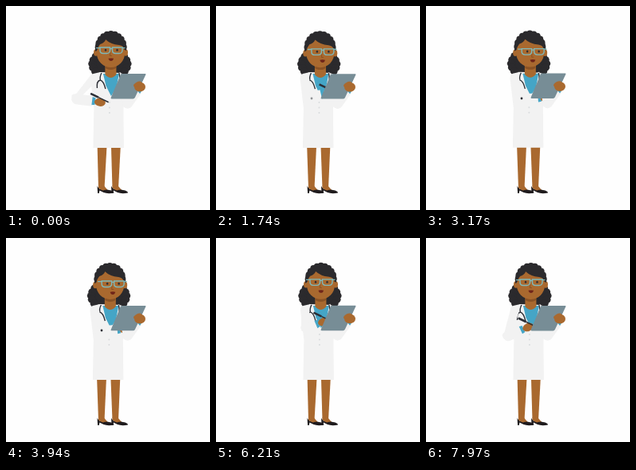
An HTML page with a canvas for the animation above (8 s loop, 256 px wide and 256 px high).

```html
<!DOCTYPE html>
<html lang="en">
<head>
<meta charset="utf-8">
<title>Doctor taking notes</title>
<style>
html, body { margin: 0; width: 100%; height: 100%; overflow: hidden; background: #fefefe; }
canvas { display: block; width: 100vw; height: 100vh; }
</style>
</head>
<body>
<canvas id="stage"></canvas>
<script>
const canvas = document.getElementById('stage');
const ctx = canvas.getContext('2d');
const LOOP = 8000;
const C = {
  bg: '#fefefe', coat: '#f2f2f2', button: '#d9dcde', skin: '#a9692f', shade: '#8a5224',
  hair: '#2b2a2d', shirt: '#45a5c6', board: '#778d96', glasses: '#7fb9ba',
  dark: '#2c2f36', shoe: '#1f1b1d', lips: '#6f2419'
};

const mix = (a, b, u) => a + (b - a) * u;

function ease(from, to, t) {
  const u = Math.min(1, Math.max(0, (t - from) / (to - from)));
  return u * u * (3 - 2 * u);
}

function pose(t) {
  const away = 1 - ease(0, 750, t) + .42 * ease(7250, 8000, t);
  const behind = ease(1200, 2300, t) - ease(3950, 4800, t);
  const turn = ease(100, 2200, t) - ease(3950, 6200, t);
  const scribble = Math.sin(t / 95) * .6 * (1 - Math.min(1, away));
  return {
    behind, turn,
    lean: 1 - 1.4 * turn,
    bob: .4 * Math.sin(t / LOOP * Math.PI * 4),
    hand: {
      x: mix(mix(135, 151, behind), 119, away) + scribble,
      y: mix(mix(103.5, 114, behind), 120, away) + scribble * .7
    },
    elbow: {
      x: mix(mix(111, 115, behind), 86, away),
      y: mix(mix(114, 117, behind), 116, away) + 36 * away * (1 - away)
    }
  };
}

function shape(color, d) {
  ctx.fillStyle = color;
  ctx.fill(new Path2D(d));
}

function line(color, width, d) {
  ctx.strokeStyle = color;
  ctx.lineWidth = width;
  ctx.stroke(new Path2D(d));
}

function oval(color, x, y, rx, ry = rx, turn = 0) {
  ctx.beginPath();
  ctx.ellipse(x, y, rx, ry, turn, 0, Math.PI * 2);
  ctx.fillStyle = color;
  ctx.fill();
}

function placed(x, y, turn, draw) {
  ctx.save();
  ctx.translate(x, y);
  ctx.rotate(turn);
  draw();
  ctx.restore();
}

function leg(hip, foot) {
  shape(C.skin, `M${hip} 174h12L${foot + 9} 229h-7.5Z`);
  placed(foot, 0, 0, () => {
    shape(C.skin, 'M1.5 225H8L14 232H4Z');
    shape(C.shoe, 'M0 226Q2 230 7 231.5Q12 230 15 231Q21 232 21 234.5Q13 236 8 234L3 231.5L2.2 235H.6Z');
  });
}

// Curly outline: bumps around the crown, then locks falling on both sides
function hair() {
  oval(C.hair, 131, 54, 19, 21);
  oval(C.hair, 130, 73, 21, 13);
  for (let a = Math.PI; a <= Math.PI * 2; a += Math.PI / 10) {
    oval(C.hair, 131.3 + 16 * Math.cos(a), 51.5 + 16.5 * Math.sin(a), 4);
  }
  for (const side of [-1, 1]) {
    for (let i = 0; i < 5; i++) {
      const out = 17.5 + 4.5 * Math.sin(i * .75);
      oval(C.hair, 130 + side * out, 63 + i * 4.8, 5.2, 4.6);
    }
  }
}

function head(turn) {
  const fx = turn * 3, fy = turn * 2;
  for (const x of [112.8, 150.2]) oval(C.skin, x, 58.5 + fy * .3, 2.8, 4.2);
  oval(C.skin, 131.5, 59, 17.6, 18);
  shape(C.hair, 'M112 57Q110 37 130 34Q152 35 151 56L149 55Q148 50 142 49Q131 48 125 42Q124 46 118 48Q115 51 114 56Z');
  placed(fx, fy, 0, () => {
    for (const x of [125, 139.5]) oval(C.dark, x, 55.3, 1.2, 1.5);
    for (const x of [118, 133.5]) {
      line(C.glasses, 1.4, `M${x} 52h12.5v4q-.5 3.5 -4 3.5h-4.5q-4 0 -4 -4Z`);
    }
    line(C.glasses, 1.3, 'M130.5 53.5h3M113 52.6h5M146 52.6h3.5');
    line(C.shade, 1, 'M131 58.5L130.4 62.5h2.6');
    shape(C.lips, 'M128.5 65.8q3.5 -.8 6.5 0q-.8 3.2 -3.2 3.2t-3.3 -3.2Z');
  });
}

function torso() {
  shape(C.coat, 'M118 83L109 85Q104.5 87 106 94L110 128L109 178H147.5L147 128L152 92Q151 86 143 84Z');
  shape(C.shirt, 'M121.5 85L141.5 85L138 103L131.5 113L125 100Z');
  shape(C.skin, 'M124 72H138V86Q131 94 124 86Z');
  oval(C.shade, 131, 77, 6.8, 3);
  for (let i = 0; i < 3; i++) oval(C.button, 129.5, 121 + i * 6.5, 1);
}

function stethoscope() {
  line(C.dark, 1.4, 'M119.5 84Q117 89 118 93M114 103Q113 94 118 93Q122 94 124.5 104');
  line(C.dark, 1.4, 'M141.5 84Q143.5 92 141 102');
}

function writingArm({ hand, elbow, behind }) {
  const turn = Math.atan2(hand.y - elbow.y, hand.x - elbow.x);
  const reach = Math.hypot(hand.x - elbow.x, hand.y - elbow.y);
  const { x, y } = elbow;
  shape(C.coat, `M107 86L117 91L${x + 7} ${y - 1}L${x + 2} ${y + 6}L${x - 4} ${y + 2}Z`);
  placed(x, y, turn, () => {
    shape(C.shirt, `M${reach - 14} -5l7 1v9l-7 1Z`);
    oval(C.skin, reach - 1, 1, 7, 5);
    shape(C.coat, `M-4 -3Q-3 -6 3 -6H${reach - 11}V7H2Q-4 6 -4 -3Z`);
  });
  placed(hand.x, hand.y, .45, () => {
    line(C.dark, 2.6, 'M-16 -3.5h11');
    line(C.dark, 1.5, 'M-5 -3.5H9');
  });
  ctx.globalAlpha = behind;
  oval(C.dark, 120, 116, 1.4);
  ctx.globalAlpha = 1;
}

function boardArm() {
  shape(C.coat, 'M143 86Q152 87 152 94L153 111L163 101L170 109L157 127Q152 131 147 126L144 105Z');
  shape(C.shirt, 'M161 102l3 -2l6 7l-2 3Z');
  shape(C.board, 'M144 85.5Q144.4 85 145.5 85H175Q176 85 175.2 86.5L161.8 115Q161 116.4 159.5 116.4H132.5Q131 116.4 131.7 115Z');
  oval(C.skin, 168, 101.5, 7, 6);
  oval(C.skin, 165, 98, 5.5, 2.6, -.5);
}

function draw(t) {
  const p = pose(t);
  ctx.fillStyle = C.bg;
  ctx.fillRect(0, 0, 256, 256);
  leg(114.2 + p.lean * .4, 114.5);
  leg(131.5 + p.lean * .4, 132);
  placed(p.lean - .6, p.bob, 0, hair);
  placed(p.lean * .4, p.bob * .5, 0, () => {
    torso();
    stethoscope();
  });
  placed(p.lean * .6 - .6, p.bob, 0, () => head(p.turn));
  writingArm(p);
  placed(0, p.bob, 0, boardArm);
}

function resize() {
  const ratio = window.devicePixelRatio || 1;
  canvas.width = Math.round(innerWidth * ratio);
  canvas.height = Math.round(innerHeight * ratio);
}

function frame(now) {
  ctx.setTransform(canvas.width / 256, 0, 0, canvas.height / 256, 0, 0);
  draw(Math.max(0, now - start) % LOOP);
  requestAnimationFrame(frame);
}

const start = performance.now();
addEventListener('resize', resize);
resize();
frame(start);
</script>
</body>
</html>
```
